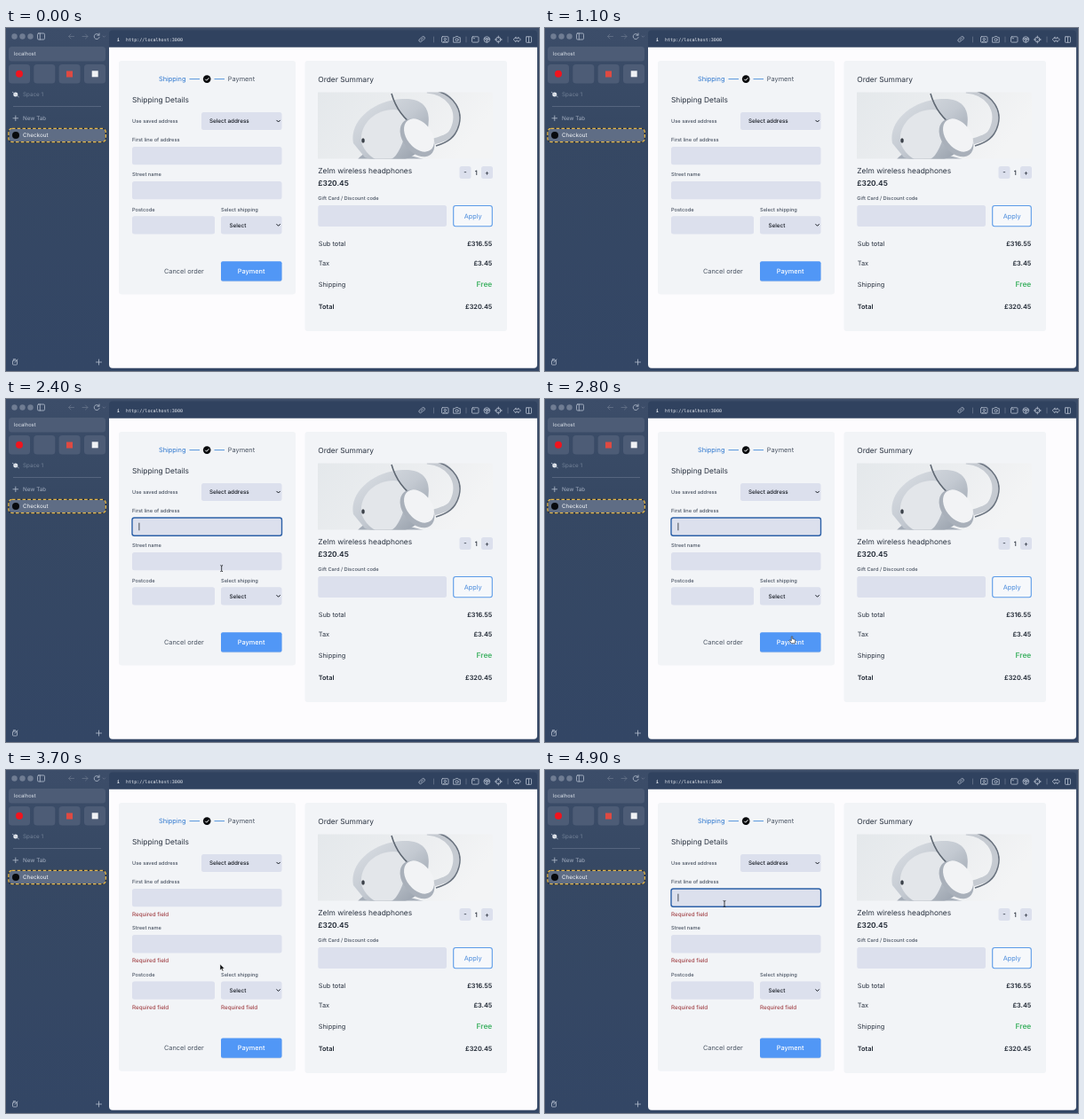
An HTML page for the animation above (5 s loop, 600 by 387 pixels).

```html
<!DOCTYPE html>
<html lang="en">
<head>
<meta charset="utf-8">
<title>Checkout</title>
<style>
  html, body { margin: 0; width: 100%; height: 100%; overflow: hidden; background: #33445f; }
  svg { display: block; width: 100vw; height: 100vh; }
  text { font: 400 7.35px Inter, "Open Sans", sans-serif; fill: #2b3442; white-space: pre; text-rendering: geometricPrecision; }
  .h { font-size: 8.4px; }
  .label { font-size: 5.7px; font-weight: 500; fill: #4a5463; }
  .select { font-size: 6.3px; font-weight: 500; fill: #11161e; }
  .error { font-size: 6.3px; fill: #96282d; }
  .strong { font-weight: 600; fill: #1c2430; }
  .med { font-weight: 500; fill: #1c2430; }
  .mid { text-anchor: middle; }
  .end { text-anchor: end; }
  .side { font-size: 6.3px; fill: #dde3ec; }
  .faint { fill: #748298; }
  .soft { fill: #a3aec0; }
  .url { font: 5.07px "DejaVu Sans Mono", "Noto Sans Mono", monospace; fill: #e8ecf2; }
  .field { fill: #dce0ed; }
  .panel { fill: #f2f4f7; }
  .icon { fill: none; stroke: #b4bece; stroke-width: .8; stroke-linecap: round; stroke-linejoin: round; }
  .dim { stroke: #66748b; }
  .chev { fill: none; stroke: #11161e; stroke-width: 1; stroke-linecap: round; stroke-linejoin: round; }
</style>
</head>
<body>
<svg viewBox="0 0 600 387" preserveAspectRatio="none">
  <defs>
    <linearGradient id="chrome" x2="0" y2="1">
      <stop offset="0" stop-color="#3c4d69"/>
      <stop offset=".3" stop-color="#364863"/>
      <stop offset="1" stop-color="#334665"/>
    </linearGradient>
    <linearGradient id="photo" x2="1" y2=".3">
      <stop offset="0" stop-color="#e4e8eb"/>
      <stop offset=".6" stop-color="#eceef0"/>
      <stop offset="1" stop-color="#f3f4f5"/>
    </linearGradient>
    <linearGradient id="cup" x2="1" y2="1">
      <stop offset="0" stop-color="#dde1e6"/>
      <stop offset=".5" stop-color="#c3c9d1"/>
      <stop offset="1" stop-color="#8f98a4"/>
    </linearGradient>
    <clipPath id="frame"><rect x="351" y="72.5" width="197" height="75"/></clipPath>
  </defs>

  <rect width="600" height="387" fill="url(#chrome)"/>

  <!-- Sidebar -->
  <g fill="#707d93">
    <circle cx="9.5" cy="9.5" r="3.200"/>
    <circle cx="18.5" cy="9.5" r="3.200"/>
    <circle cx="27.5" cy="9.5" r="3.200"/>
  </g>
  <g class="icon">
    <rect x="35.5" y="6" width="8" height="7" rx="1.3"/>
    <path d="M38.300 6v7"/>
    <path class="dim" d="M76.500 9.500h-6m2.500-2.500l-2.500 2.500 2.500 2.500M86 9.500h6m-2.500-2.500l2.500 2.500-2.500 2.500"/>
    <path d="M104.800 8a3 3 0 1 0 .3 2.500M105 6v2.200h-2.200"/>
    <path class="dim" d="M109 9l1.300 1.300L111.600 9"/>
  </g>
  <rect x="3" y="21" width="109" height="16.5" rx="3.5" fill="#4d5c76"/>
  <text class="side" x="8.8" y="31.400" style="font-size:5.8px">localhost</text>
  <g fill="#4d5c76">
    <rect x="3" y="41" width="24" height="21.5" rx="3.5"/>
    <rect x="31.3" y="41" width="24" height="21.5" rx="3.5"/>
    <rect x="59.6" y="41" width="24" height="21.5" rx="3.5"/>
    <rect x="88" y="41" width="24" height="21.5" rx="3.5"/>
  </g>
  <circle cx="15" cy="51.7" r="4" fill="#f0141e"/>
  <rect x="68" y="48.5" width="7" height="7" fill="#df4a42"/>
  <rect x="96.7" y="48.3" width="7" height="7" fill="#f0f2f5"/>
  <circle cx="10.8" cy="75" r="2.5" fill="#e4e8ee"/>
  <path class="icon" d="M7.300 72.300l7 5.400"/>
  <text class="side faint" x="19" y="77.3">Space 1</text>
  <path d="M8 88.500h99" stroke="#5f6d86" stroke-width=".8"/>
  <path class="icon" d="M8 101.800h5.600M10.800 99v5.600"/>
  <text class="side soft" x="19" y="104.2">New Tab</text>
  <g stroke-width="1.3">
    <rect x="2.9" y="113.4" width="109.4" height="15.2" rx="4" fill="#5f6d85" stroke="#272d36"/>
    <rect x="2.9" y="113.4" width="109.4" height="15.2" rx="4" fill="none" stroke="#e6b94c" stroke-dasharray="3.6 2.2"/>
  </g>
  <circle cx="11" cy="121" r="4" fill="#080a0d"/>
  <text class="side" x="19" y="123.4" style="fill:#f6f8fb">Checkout</text>
  <g class="icon">
    <rect x="7.5" y="375" width="5" height="5" rx=".8"/>
    <path d="M8.300 373.700h2.300M10 377.500l3-3.500M101.500 377h6M104.500 374v6"/>
  </g>

  <!-- Browser window -->
  <rect x="116" y="2.5" width="482" height="381.3" rx="4" fill="#30425f"/>
  <path d="M116 21.700h482v358a4 4 0 0 1-4 4h-474a4 4 0 0 1-4-4z" fill="#fdfcfe"/>
  <text class="url" x="124.7" y="15.2" style="font-weight:bold">i</text>
  <text class="url" x="135" y="15.1">http://localhost:3000</text>
  <g class="icon">
    <path d="M467 13.700l2.300-2.300M467.300 11.300l1.300-1.300a1.700 1.700 0 0 1 2.400 2.400l-1.300 1.300M469 13.900l-1.300 1.300a1.700 1.700 0 0 1-2.400-2.400l1.300-1.300"/>
    <rect x="490.5" y="9.7" width="7.5" height="6.5" rx="1"/>
    <circle cx="494.3" cy="12.6" r="1.2"/>
    <path d="M492 15.700q2.300-2.200 4.600 0"/>
    <path d="M504 10.700h1.600l.8-1.200h2.400l.8 1.200h1.700v5.500h-7.300z"/>
    <circle cx="507.6" cy="13.2" r="1.5"/>
    <rect x="524.5" y="9.8" width="7.5" height="6.3" rx="1"/>
    <path d="M526 11.700h1.500"/>
    <circle cx="541.3" cy="13" r="3.3"/>
    <circle cx="541.3" cy="13" r="1.3"/>
    <path d="M538.200 12h6.200M541.300 14.300v2"/>
    <circle cx="554.3" cy="13" r="2.8"/>
    <path d="M554.300 9v2.500M554.300 14.500V17M550.300 13h2.500M555.800 13h2.500"/>
    <path d="M574 10.200L571.200 13l2.800 2.800v-1.500h2.600v1.500l2.800-2.800-2.800-2.800v1.500H574z"/>
    <rect x="585.5" y="9.8" width="6" height="6.5" rx=".6"/>
    <path d="M588.500 9.800v6.500"/>
    <path class="dim" d="M481.500 10v6M518 10v6M565 10v6"/>
  </g>

  <!-- Order summary -->
  <rect class="panel" x="336.5" y="37" width="227.5" height="305" rx="3"/>
  <text class="h" x="351.3" y="61.2">Order Summary</text>
  <g clip-path="url(#frame)">
    <rect x="351" y="72" width="197" height="76" fill="url(#photo)"/>
    <path d="M396 148C408 132 440 140 470 148z" fill="#a5adb8"/>
    <path d="M391 130C386 106 412 82 446 80S480 104 470 130 420 152 404 146z" fill="url(#cup)"/>
    <path d="M400 128C398 108 416 92 436 92S452 124 440 142 404 146 400 128z" fill="#e3e6ea"/>
    <path d="M434 74C438 88 446 102 462 112" fill="none" stroke="#5f6873" stroke-width="1.600"/>
    <path d="M474 70C500 72 510 92 506 108S494 124 482 128" fill="none" stroke="#c5cad1" stroke-width="7"/>
    <path d="M482 70C506 76 514 94 510 109S497 129 484 133" fill="none" stroke="#69727e" stroke-width="1.500"/>
    <ellipse cx="463" cy="124" rx="16" ry="24" transform="rotate(-38 463 124)" fill="#a9b0ba"/>
    <ellipse cx="465" cy="121" rx="14" ry="21" transform="rotate(-38 465 121)" fill="#f2f3f5"/>
    <ellipse cx="402" cy="127" rx="1.800" ry="2.800" fill="#3c424a"/>
  </g>
  <text class="h" x="351.3" y="164.3">Zelm wireless headphones</text>
  <text class="h strong" x="351.3" y="177.7">£320.45</text>
  <rect class="field" x="510.5" y="156" width="13" height="14" rx="2.5"/>
  <rect class="field" x="535" y="156" width="13" height="14" rx="2.5"/>
  <text class="mid med" x="517" y="165.3">-</text>
  <text class="mid med" x="529.2" y="165.5">1</text>
  <text class="mid med" x="541.5" y="165.5">+</text>
  <text class="label" x="351.3" y="194">Gift Card / Discount code</text>
  <rect class="field" x="351.3" y="200" width="144.7" height="24" rx="2.5"/>
  <rect x="503.7" y="200.5" width="43.6" height="23.2" rx="2.5" fill="#f6f8fb" stroke="#5b9be8" stroke-width="1.1"/>
  <text class="mid" x="525.7" y="214.8" style="fill:#4a8bdc">Apply</text>
  <text x="351.8" y="245.7">Sub total</text>
  <text class="end strong" x="547.3" y="245.7">£316.55</text>
  <text x="351.8" y="268.2">Tax</text>
  <text class="end strong" x="547.3" y="268.2">£3.45</text>
  <text x="351.8" y="291.5">Shipping</text>
  <text class="end" x="547.3" y="291.7" style="font-size:8.4px;font-weight:600;fill:#43b366">Free</text>
  <text class="strong" x="351.8" y="316.7">Total</text>
  <text class="end strong" x="547.3" y="316.7">£320.45</text>

  <!-- Shipping form -->
  <rect id="card" class="panel" x="127" y="37" width="199" height="263.5" rx="3"/>
  <text x="172" y="60.3" style="fill:#2f78cf">Shipping</text>
  <path d="M206.500 57.600h11.500M234.500 57.600h11.500" stroke="#5596dc" stroke-width="1"/>
  <circle cx="226.2" cy="57.6" r="4.300" fill="#07090c"/>
  <path d="M224.200 57.700l1.500 1.500 2.700-2.900" fill="none" stroke="#fff" stroke-width="1"/>
  <text x="249.8" y="60.3" style="fill:#4a5463">Payment</text>
  <text class="h" x="142" y="83.5">Shipping Details</text>
  <text class="label" x="142" y="107">Use saved address</text>
  <rect class="field" x="220" y="95" width="90.5" height="20" rx="2.5"/>
  <text class="select" x="229" y="107.3">Select address</text>
  <path class="chev" d="M304.800 104.200l1.800 1.800 1.800-1.800"/>
  <text class="label" x="142" y="128">First line of address</text>
  <rect class="field" x="142" y="134" width="168.5" height="20.3" rx="2.5"/>
  <g id="focus">
    <rect x="142" y="134" width="168.5" height="20.3" rx="2.5" fill="none" stroke="#2d61a8" stroke-width="1.4"/>
    <path d="M149.900 139.700v8.600" stroke="#20262f" stroke-width=".8"/>
  </g>
  <g id="street">
    <text class="label" x="142" y="167.4">Street name</text>
    <rect class="field" x="142" y="173" width="168.5" height="20.3" rx="2.5"/>
  </g>
  <g id="postal">
    <text class="label" x="142" y="206.7">Postcode</text>
    <rect class="field" x="142" y="212.2" width="93" height="20.3" rx="2.5"/>
    <text class="label" x="242" y="206.7">Select shipping</text>
    <rect class="field" x="242" y="212.2" width="68.5" height="20.3" rx="2.5"/>
    <text class="select" x="251.5" y="224.7">Select</text>
    <path class="chev" d="M304.800 221.500l1.800 1.800 1.800-1.800"/>
  </g>
  <g id="actions">
    <text x="178" y="277" style="fill:#4a5463">Cancel order</text>
    <rect x="242" y="264" width="68.5" height="22.3" rx="2" fill="#d3dae5"/>
    <rect x="242" y="263.2" width="68.5" height="22.3" rx="2" fill="#5197f6"/>
    <text class="mid" x="276.2" y="277" style="font-weight:500;fill:#fff">Payment</text>
  </g>
  <g id="errors">
    <text class="error" x="142" y="165">Required field</text>
    <text class="error" x="142" y="217.3">Required field</text>
    <text class="error" x="142" y="269.6">Required field</text>
    <text class="error" x="242" y="269.6">Required field</text>
  </g>

  <g id="cursor">
    <path id="arrow" d="M0 0v7l1.600-1.500 1.100 2.600 1.200-.5-1.100-2.500h2.200z" fill="#0b0d10" stroke="#fff" stroke-width=".5"/>
    <path id="beam" d="M-1.400-3.500q1.400 0 1.400 1v5q0 1-1.400 1M1.400-3.500Q0-3.500 0-2.500M1.400 3.500Q0 3.500 0 2.500" fill="none" stroke="#15181d" stroke-width=".8"/>
    <path id="hand" d="M-.7 1.500v-5q.7-1 1.400 0v2.700l2.400.6q.8.300.7 1.200l-.6 3.200h-3.700l-2.600-3.100q.4-1.200 1.500-.3z" fill="#fff" stroke="#15181d" stroke-width=".6"/>
  </g>
</svg>
<script>
  const LOOP = 5000, STEP = 100;
  const FOCUS = 2200, SUBMIT = 3000, BLUR = 3700, REFOCUS = 4600;
  // Pointer stops: time, x, y
  const stops = [
    [1300, 340, 216], [1800, 223.5, 147.5], [2200, 223.5, 147.5],
    [2700, 278, 271.5], [3000, 278, 271.5], [3200, 273.6, 272],
    [3400, 273.6, 272], [4000, 208.3, 166], [4200, 208.3, 166],
    [4500, 202, 151], [5000, 202, 151]
  ];
  const cursors = ['arrow', 'beam', 'hand'];
  const $ = id => document.getElementById(id);
  const show = (id, on) => $(id).setAttribute('visibility', on ? 'inherit' : 'hidden');
  const move = (id, x, y) => $(id).setAttribute('transform', `translate(${x} ${y})`);
  const ease = k => k * k * (3 - 2 * k);
  const within = (v, lo, hi) => v >= lo && v <= hi;

  function pointerAt(t) {
    const i = stops.findIndex(s => s[0] > t);
    const [t0, x0, y0] = stops[i - 1], [t1, x1, y1] = stops[i];
    const k = ease((t - t0) / (t1 - t0));
    return [x0 + (x1 - x0) * k, y0 + (y1 - y0) * k];
  }

  function pointerKind(x, y, grow) {
    const overButton = within(x, 242, 310) && within(y, 263 + 3 * grow, 285 + 3 * grow);
    const overField = within(x, 142, 310) &&
      (within(y, 134, 154) || within(y, 173 + grow, 193 + grow));
    return overButton ? 'hand' : overField ? 'beam' : 'arrow';
  }

  function draw(ms) {
    const t = Math.floor(ms % LOOP / STEP) * STEP;
    const invalid = t >= SUBMIT;
    const grow = invalid ? 13.1 : 0; // room for one row of errors
    show('errors', invalid);
    show('focus', t >= FOCUS && t < BLUR || t >= REFOCUS);
    $('card').setAttribute('height', 263.5 + 3 * grow);
    move('street', 0, grow);
    move('postal', 0, 2 * grow);
    move('actions', 0, 3 * grow);

    const visible = t >= stops[0][0];
    show('cursor', visible);
    const [x, y] = visible ? pointerAt(t) : [0, 0];
    const kind = visible && pointerKind(x, y, grow);
    move('cursor', x, y);
    cursors.forEach(id => show(id, id === kind));
  }

  function tick() {
    draw(performance.now());
    requestAnimationFrame(tick);
  }
  tick();
</script>
</body>
</html>
```
